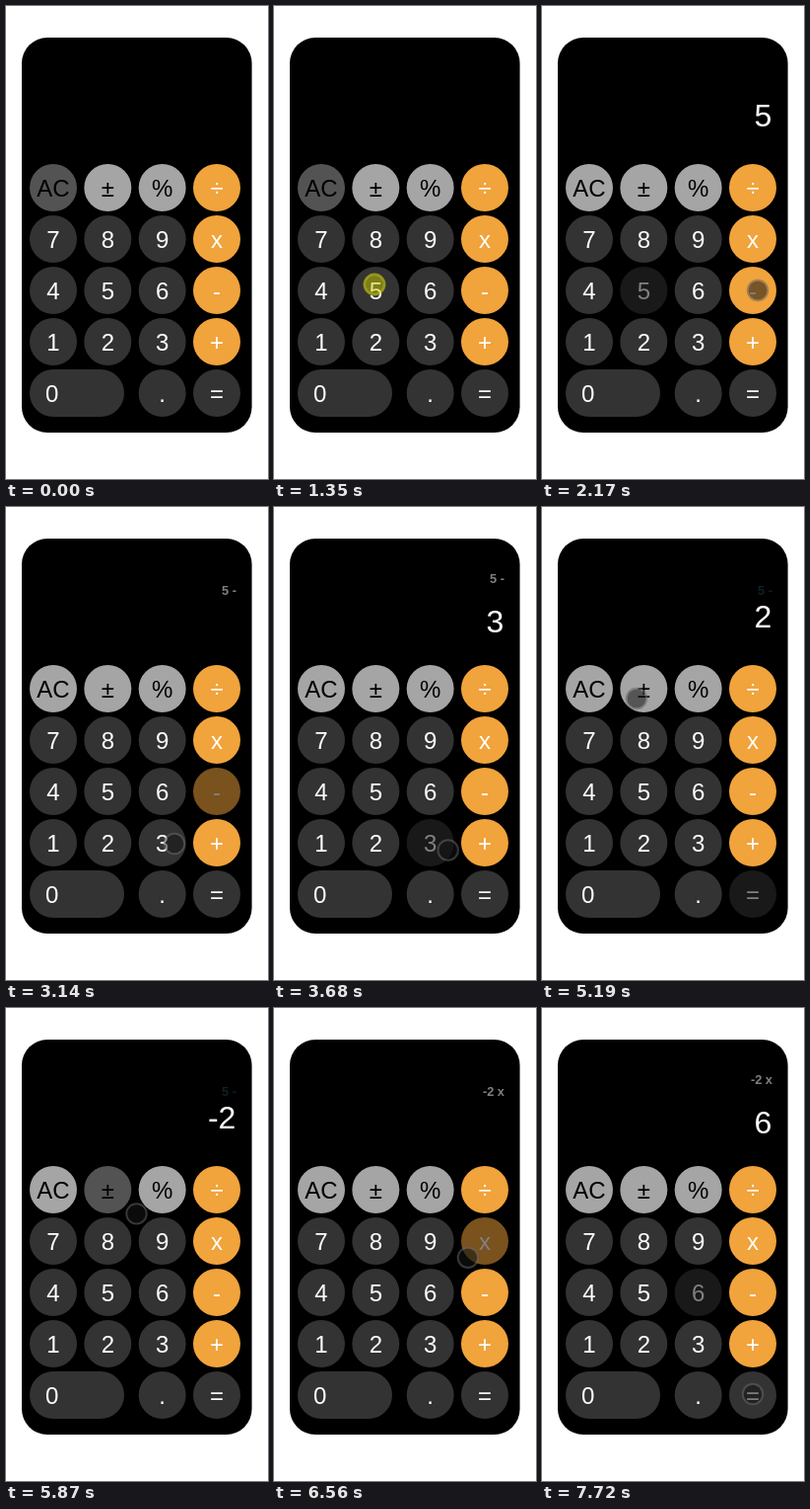
These frames come from a looping animation (266x479 px, 8000 ms). An HTML page:

```html
<!DOCTYPE html>
<html lang="en">
<head>
<meta charset="utf-8">
<title>Calculator</title>
<style>
  html, body { margin: 0; width: 100%; height: 100%; overflow: hidden; background: #fff; }
  svg { display: block; width: 100%; height: 100%; font-family: "Liberation Sans", Arial, sans-serif; }
  .key text { font-size: 24px; text-anchor: middle; }
  .dim { opacity: .5; }
  .readout { text-anchor: end; }
  #value { font-size: 32px; fill: #fff; }
  #history, #echo { font-size: 12.8px; font-weight: bold; }
  #history { fill: #808080; }
  #echo { fill: #0f2027; }
  #tap { fill: rgba(51, 181, 229, .4); }
  #cursor .disc { fill: rgba(20, 20, 20, .55); }
  #cursor .ring { fill: none; stroke: rgba(100, 100, 100, .55); stroke-width: 2; }
  #cursor.down .disc { fill: rgba(200, 200, 0, .5); }
  #cursor.down .ring { stroke: rgba(200, 200, 20, .65); stroke-width: 2.5; }
</style>
</head>
<body>
<svg viewBox="0 0 266 479">
  <rect x="16" y="32" width="233.6" height="400" rx="26"/>
  <text id="echo" class="readout" x="234" y="89">5 -</text>
  <text id="history" class="readout" x="234"></text>
  <text id="value" class="readout" x="233.4"></text>
  <g id="keys"></g>
  <rect id="tap" width="48" height="48"/>
  <g id="cursor"><circle class="disc" r="9.5"/><circle class="ring" r="10.2"/></g>
</svg>
<script>
const LOOP = 8000, STEP = 70, SIZE = 48;
const $ = id => document.getElementById(id);
const keys = {};

function add(parent, tag, attrs, text = '') {
  const el = document.createElementNS('http://www.w3.org/2000/svg', tag);
  for (const name in attrs) el.setAttribute(name, attrs[name]);
  el.textContent = text;
  return parent.appendChild(el);
}

function addKey(label, col, row, wide) {
  const x = 24 + col * 55.33, y = 160 + row * 52;
  const light = row === 0 && col < 3;
  const orange = col === 3 && row < 4;
  const el = add($('keys'), 'g', { class: 'key' });
  add(el, 'rect', {
    x, y, width: wide ? 96 : SIZE, height: SIZE, rx: SIZE / 2,
    fill: light ? '#a5a5a5' : orange ? '#f1a33c' : '#333'
  });
  add(el, 'text', { x: wide ? 46.7 : x + SIZE / 2, y: y + 33, fill: light ? '#000' : '#fff' }, label);
  keys[label] = { el, x, y };
}

['AC ± % ÷', '7 8 9 x', '4 5 6 -', '1 2 3 +'].forEach((line, row) =>
  line.split(' ').forEach((label, col) => addKey(label, col, row)));
addKey('0', 0, 4, true);
addKey('.', 2, 4);
addKey('=', 3, 4);

const presses = [
  { key: '5', down: 1350, up: 1480, clear: 1620, value: '5', history: '' },
  { key: '-', down: 2520, up: 2590, clear: 2730, value: '', history: '5 -' },
  { key: '3', down: 3340, up: 3410, clear: 3550, value: '3', history: '5 -' },
  { key: '=', down: 4160, up: 4290, clear: 4500, value: '2', history: '' },
  { key: '±', down: 5390, up: 5460, clear: 5530, value: '-2', history: '' },
  { key: 'x', down: 6210, up: 6280, clear: 6490, value: '', history: '-2 x' },
  { key: '6', down: 7030, up: 7100, clear: 7240, value: '6', history: '-2 x' }
];

// start, end, x, y
const moves = [
  [260, 850, 93, 276],
  [880, 1020, 102, 282],
  [1760, 2170, 219, 288],
  [2730, 3140, 171, 341],
  [3550, 4100, 215, 391],
  [4500, 5190, 96, 194],
  [5670, 6150, 208, 238],
  [6490, 6830, 167, 293],
  [7240, 7720, 214, 391]
];

function cursorAt(time) {
  let x = 209, y = 440;
  for (const [start, end, toX, toY] of moves) {
    if (time < start) break;
    const taken = Math.floor((time - start) / STEP) + 1;
    const p = time >= end ? 1 : Math.min(1, taken / ((end - start) / STEP + 1));
    const eased = p * p * (3 - 2 * p);
    x += (toX - x) * eased;
    y += (toY - y) * eased;
  }
  return [x, y];
}

function show(el, visible) {
  el.setAttribute('visibility', visible ? 'visible' : 'hidden');
}

function draw(time) {
  const last = presses.filter(p => time >= p.up).pop();
  const { key, value, history } = last || { value: '', history: '' };

  for (const label in keys) {
    const dim = label === key || (label === 'AC' && !last);
    keys[label].el.classList.toggle('dim', dim);
  }
  $('value').textContent = value;
  $('value').setAttribute('y', history ? 127 : 122);
  $('history').textContent = history;
  $('history').setAttribute('y', value ? 77 : 89);
  show($('echo'), time >= 4290 && time < 6280);

  const tapped = last && time < last.clear;
  show($('tap'), tapped);
  if (tapped) {
    $('tap').setAttribute('x', keys[key].x);
    $('tap').setAttribute('y', keys[key].y);
  }

  const cursor = $('cursor');
  show(cursor, time >= 260);
  cursor.classList.toggle('down', presses.some(p => time >= p.down && time < p.up));
  cursor.setAttribute('transform', `translate(${cursorAt(time)})`);
}

const began = performance.now();
function tick() {
  draw((performance.now() - began) % LOOP);
  requestAnimationFrame(tick);
}
tick();
</script>
</body>
</html>
```
